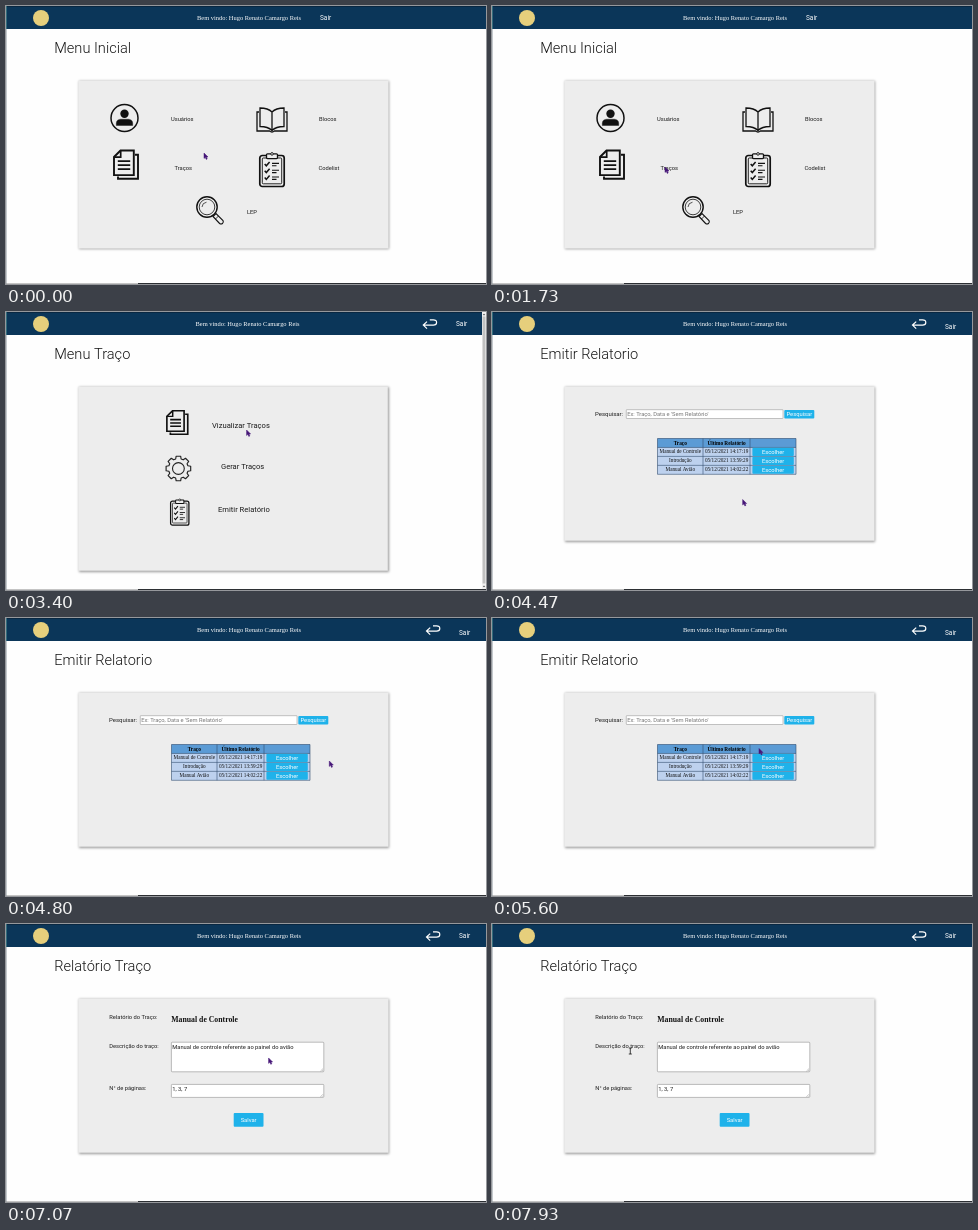
Recreate the animation shown at these times as an HTML page with a canvas. Size 480 px wide and 278 px high, loop 8 s.

```html
<!DOCTYPE html>
<html lang="pt">
<head>
<meta charset="utf-8">
<title>Menu</title>
<style>
html, body { margin: 0; width: 100%; height: 100%; overflow: hidden; background: #fefefe; }
canvas { display: block; width: 480px; height: 278px; }
</style>
</head>
<body>
<canvas id="stage"></canvas>
<script>
const W = 480, H = 278, LOOP = 8000, TICK = 200 / 3;
const SANS = 'Roboto, Arial, sans-serif';
const SERIF = '"Liberation Serif", Times, serif';
const INK = '#1c1c1c', BLUE = '#1fb2ea', GRID = '#35506f';

const canvas = document.getElementById('stage');
const ratio = window.devicePixelRatio || 1;
canvas.width = W * ratio;
canvas.height = H * ratio;
const ctx = canvas.getContext('2d');

function text(str, x, y, size = 5.75, color = INK, font = SANS, weight = 400, align = 'left') {
  ctx.font = `${weight} ${size}px ${font}`;
  ctx.fillStyle = color;
  ctx.textAlign = align;
  ctx.fillText(str, x, y);
}

function rect(x, y, w, h, color) {
  ctx.fillStyle = color;
  ctx.fillRect(x, y, w, h);
}

function box(x, y, w, h, r, fill, stroke, width = 0.5) {
  ctx.beginPath();
  ctx.roundRect(x, y, w, h, r);
  if (fill) { ctx.fillStyle = fill; ctx.fill(); }
  if (stroke) { ctx.strokeStyle = stroke; ctx.lineWidth = width; ctx.stroke(); }
}

function line(d, width = 1, color = '#111', fill) {
  const p = new Path2D(d);
  if (fill) { ctx.fillStyle = fill; ctx.fill(p); }
  ctx.strokeStyle = color;
  ctx.lineWidth = width;
  ctx.stroke(p);
}

function disc(x, y, r, fill, stroke, width) {
  ctx.beginPath();
  ctx.arc(x, y, r, 0, Math.PI * 2);
  if (fill) { ctx.fillStyle = fill; ctx.fill(); }
  if (stroke) { ctx.strokeStyle = stroke; ctx.lineWidth = width; ctx.stroke(); }
}

function at(x, y, sx, sy, draw) {
  ctx.save();
  ctx.translate(x, y);
  ctx.scale(sx, sy);
  draw();
  ctx.restore();
}

// Icons
function userIcon() {
  disc(118.5, 112, 13.5, null, '#111', 1.5);
  disc(118.5, 107.8, 4.2, '#111');
  line('M110.3 119.5V117.5Q110.3 113.5 114.5 113.2H122.5Q126.7 113.5 126.7 117.5V119.5Z', 0.4, '#111', '#111');
}

function docsIcon() {
  line('M5 27V29.3H25V5.2H22', 1.9);
  line('M7.5 1H20.8V25.6H1V7.5Z', 1.9, '#111', '#ededed');
  line('M7.7 1V7.7H1', 1.7);
  line('M4.8 11.6H17.2M4.8 15.6H17.2M4.8 19.6H17.2', 1.9);
}

function bookIcon() {
  line('M253 106H251V125H263.5Q266 127 268.5 125H281V106H279', 1.3);
  line('M266 106Q262 102 254 102V120.5Q262 120.5 266 124.5Q270 120.5 278 120.5V102Q270 102 266 106V124', 1.3);
}

function clipIcon() {
  box(0.8, 3.5, 24.4, 31, 2.5, null, '#111', 1.7);
  box(3.3, 6, 19.4, 25.8, 1, null, '#111', 0.9);
  box(7.5, 1.8, 11, 4.8, 1, '#ededed', '#111', 1.3);
  disc(13, 1.9, 1.3, '#ededed', '#111', 0.9);
  for (let y = 12; y < 30; y += 6.8) {
    line(`M5.7 ${y}l1.6 1.8 3.3-3.8`, 1.5);
    line(`M13 ${y - 0.6}h7M13 ${y + 1.8}h4.5`, 1.1);
  }
}

function lensIcon() {
  disc(201, 201, 10.2, null, '#111', 1.4);
  disc(201, 201, 7.8, null, '#111', 0.8);
  line('M196 201Q196.3 196.8 200.5 196.2', 0.7);
  line('M208 209.5L210 207.5 217 214.5Q218 216.5 216.5 217.5T213.6 217.5L207 210.5Z', 1.1, '#111', '#ededed');
  line('M209.5 213L212.5 210', 0.8);
}

function gearIcon() {
  const teeth = 8, step = Math.PI * 2 / teeth;
  const shape = [[-0.28, 9.9], [-0.18, 12.5], [0.18, 12.5], [0.28, 9.9]];
  ctx.beginPath();
  for (let i = 0; i < teeth; i++) {
    for (const [a, r] of shape) ctx.lineTo(r * Math.cos(i * step + a), r * Math.sin(i * step + a));
  }
  ctx.closePath();
  ctx.lineJoin = 'round';
  ctx.strokeStyle = '#222';
  ctx.lineWidth = 1.15;
  ctx.stroke();
  ctx.lineJoin = 'miter';
  disc(0, 0, 5.9, null, '#222', 1.1);
}

// Page frame
function header(nameX, sairX, sairY, arrowX) {
  rect(0, 0, W, 23, '#0b3659');
  rect(0, 0, W, 0.7, '#0a2237');
  disc(35, 12, 8, '#e6cf7c');
  text('Bem vindo: Hugo Renato Camargo Reis', nameX, 14, 6.45, '#fff', SERIF);
  text('Sair', sairX, sairY, 6.5, '#fff');
  if (arrowX) {
    at(arrowX, 0.3, 1, 1, () => line('M4.2 9.3L.5 12.8 4.2 16.3M.5 12.8H10.5Q13.8 12.8 13.8 10.2T10.5 7.6H7', 1.2, '#fff'));
  }
}

function page(title, right, bottom) {
  rect(0, 0, W, H, '#fefefe');
  text(title, 48.2, 47, 14.6, '#161616', SANS, 300);
  ctx.save();
  ctx.shadowColor = 'rgba(0,0,0,.4)';
  ctx.shadowBlur = 2.5 * ratio;
  ctx.shadowOffsetX = ctx.shadowOffsetY = 0.8 * ratio;
  rect(72.3, 74.6, right - 72.3, bottom - 74.6, '#ededed');
  ctx.restore();
}

function button(label, x, y, w, h, base) {
  box(x, y, w, h, 1, BLUE);
  text(label, x + w / 2, base, 5.8, '#fff', SANS, 400, 'center');
}

function scrollbar() {
  rect(476, 0, 4, H, '#f1f1f1');
  rect(476.6, 4.5, 2.8, 267, '#c1c1c1');
  line('M477 3L478 1.8 479 3ZM477 274L478 275.2 479 274Z', 0.3, '#555', '#555');
}

function mainMenu() {
  page('Menu Inicial', 382.5, 242.5);
  header(191, 314, 14.2);
  userIcon();
  at(107, 143.5, 1, 1, docsIcon);
  bookIcon();
  at(253, 146, 1, 1, clipIcon);
  lensIcon();
  text('Usuários', 165, 114.5);
  text('Blocos', 313, 114.5);
  text('Traços', 168.5, 163.5);
  text('Codelist', 312.5, 163.5);
  text('LEP', 241, 207.5);
}

function traceMenu() {
  page('Menu Traço', 381.8, 258.7);
  header(189.5, 450, 14.2, 416.8);
  scrollbar();
  at(160, 98, 0.87, 0.83, docsIcon);
  at(172.4, 156.5, 1, 1, gearIcon);
  at(164, 186.5, 0.75, 0.77, clipIcon);
  text('Vizualizar Traços', 206, 115.6, 7.6);
  text('Gerar Traços', 215, 157.2, 7.6);
  text('Emitir Relatório', 212, 200.4, 7.6);
}

const rows = [
  ['Manual de Controle', '14:17:19'],
  ['Introdução', '13:59:29'],
  ['Manual Avião', '14:02:22']
];

function reportList() {
  page('Emitir Relatorio', 382.5, 228.7);
  header(191, 453, 16.5, 420);
  text('Pesquisar:', 103, 104.2, 6);
  box(134.3, 97.7, 156.7, 8.8, 0.5, '#fff', '#888');
  text("Ex: Traço, Data e 'Sem Relatório'", 135.2, 104.1, 5.75, '#757575');
  button('Pesquisar', 292.3, 98, 30, 8.5, 104.2);

  const top = 126.5, rh = 8.95, cols = [165.5, 211, 258, 304];
  rect(165.5, top, 138.5, rh * 4, '#bdd1ee');
  rect(165.5, top, 138.5, rh, '#5b9bd5');
  for (const x of cols) line(`M${x} ${top}v${rh * 4}`, 0.6, GRID);
  for (let i = 0; i < 5; i++) line(`M165.5 ${top + rh * i}h138.5`, 0.6, GRID);
  text('Traço', 188.3, top + 6, 5.3, '#000', SERIF, 700, 'center');
  text('Último Relatório', 234.5, top + 6, 5.3, '#000', SERIF, 700, 'center');
  rows.forEach(([name, time], i) => {
    const y = top + rh * (i + 1);
    text(name, 188.3, y + 5.6, 5.2, '#111', SERIF, 400, 'center');
    text('05/12/2021 ' + time, 234.6, y + 5.6, 5.2, '#111', SERIF, 400, 'center');
    button('Escolher', 260.4, y + 0.4, 41.4, 8.1, y + 6.4);
  });
}

function area(y, h, str) {
  box(165.4, y, 152.4, h, 0.8, '#fff', '#7c7c7c');
  text(str, 166.3, y + 6.8);
  line(`M317 ${y + h - 3.2}l-2.6 2.6M317 ${y + h - 1.7}l-1.1 1.1`, 0.4, '#777');
}

function reportForm() {
  page('Relatório Traço', 382.5, 228.7);
  header(191, 453, 14.2, 420);
  text('Relatório do Traço:', 103.3, 95.2);
  text('Manual de Controle', 165.3, 97.6, 7.75, '#111', SERIF, 700);
  text('Descrição do traço:', 103.3, 123.6);
  area(118.2, 29.6, 'Manual de controle referente ao painel do avião');
  text('N° de páginas:', 103.3, 165.8);
  area(160.4, 13, '1, 3, 7');
  button('Salvar', 227.7, 189, 29.8, 13.8, 197.9);
}

// Pointer: time, x, y
const path = [
  [0, 198, 147], [520, 171, 160], [670, 173, 161], [1730, 173, 161],
  [2070, 201.3, 155], [2530, 229, 149], [3400, 240.6, 118],
  [4200, 232, 199], [4330, 232, 199], [4800, 323.3, 143],
  [5130, 299, 122], [5400, 282, 111], [5800, 252, 150], [5940, 252, 150],
  [6330, 271.2, 139], [6900, 271.2, 139], [7730, 189, 91], [7930, 138.3, 127]
];

function pointerAt(t) {
  let i = 0;
  while (i < path.length - 1 && path[i + 1][0] <= t) i++;
  const a = path[i], b = path[i + 1] || a;
  const u = b === a ? 0 : (t - a[0]) / (b[0] - a[0]);
  const e = u * u * (3 - 2 * u);
  return [a[1] + (b[1] - a[1]) * e, a[2] + (b[2] - a[2]) * e];
}

function pointer(t) {
  const [x, y] = pointerAt(t);
  at(x, y, 1, 1, () => {
    if (t > 7700) line('M-1.5-3H1.5M0-3V3M-1.5 3H1.5', 0.8, '#111');
    else line('M0 0V5.4L1.3 4.3 2.2 6.4 3.2 5.9 2.4 4H4Z', 0.5, '#461778', '#461778');
  });
}

function edges() {
  rect(0, 277, 132, 1, '#c4c4c4');
  rect(132, 277, W - 132, 1, '#2c2f33');
  rect(0, 0, 0.5, H, '#8b949c');
  rect(0, 0, 0.8, 23, '#2d6f7c');
}

function draw(time) {
  const t = Math.floor((time % LOOP + 4) / TICK) * TICK;
  ctx.setTransform(ratio, 0, 0, ratio, 0, 0);
  if (t < 1790) mainMenu();
  else if (t < 4390) traceMenu();
  else if (t < 6930) reportList();
  else reportForm();
  edges();
  pointer(t);
}

const start = performance.now();
function loop() {
  draw(performance.now() - start);
  requestAnimationFrame(loop);
}
loop();
</script>
</body>
</html>
```
